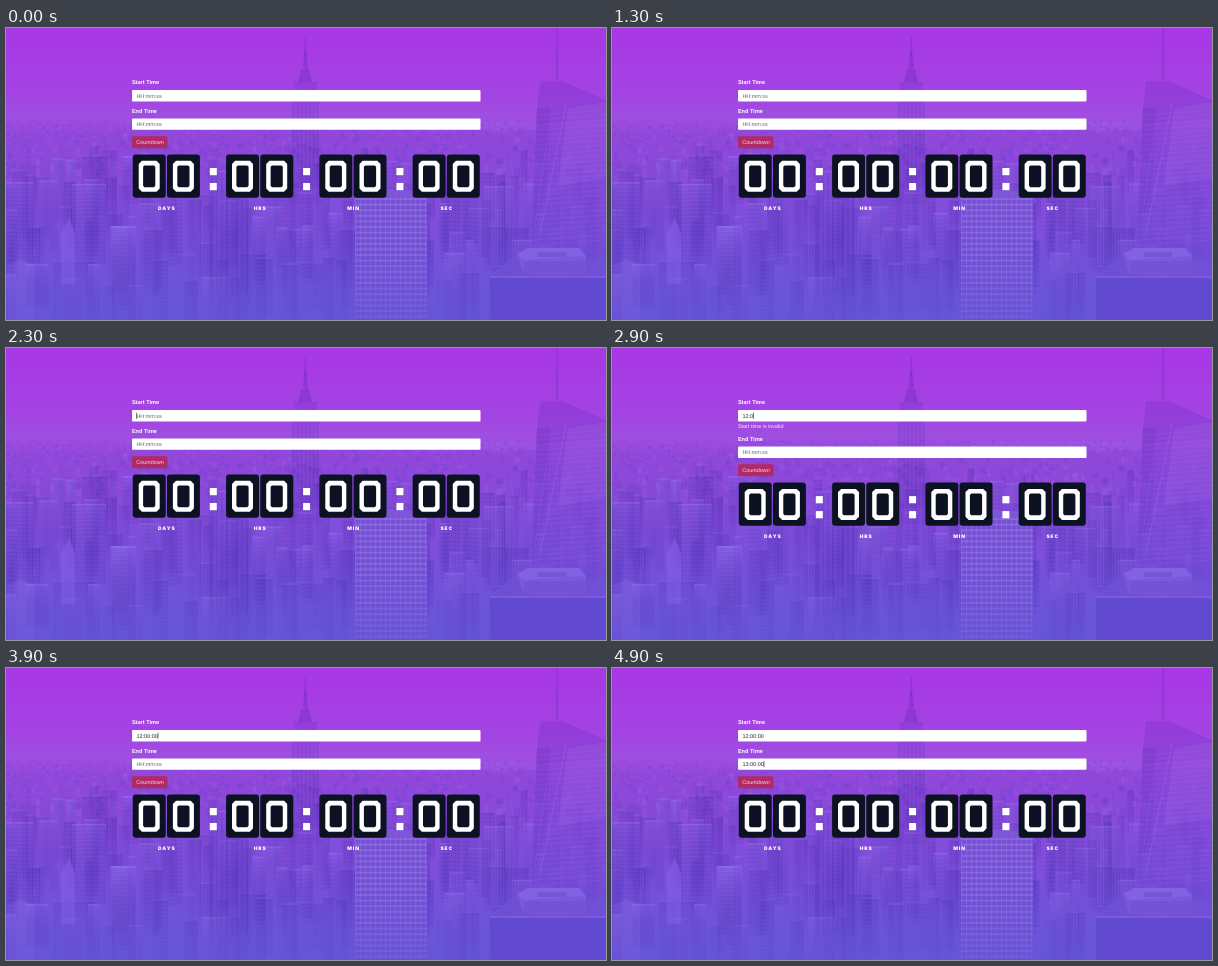
An HTML page with a canvas for the animation above (5 s loop, 600 by 292 pixels).

```html
<!DOCTYPE html>
<html lang="en">
<head>
<meta charset="utf-8">
<title>Countdown</title>
<style>
html, body { margin: 0; width: 100%; height: 100%; overflow: hidden; background: #8a45e0; }
canvas, svg { position: absolute; left: 0; top: 0; width: 600px; height: 292px; display: block; }
text { font: 5.5px "Liberation Sans", Arial, sans-serif; fill: #fff; text-rendering: geometricPrecision; white-space: pre; }
.label { font-weight: 700; font-size: 5.6px; }
.error { fill: #f6ecff; font-size: 5.45px; }
.value { fill: #22252c; }
.value.empty { fill: #5f656d; font-size: 5.45px; }
.button { fill: #f6d3e2; font-size: 5.45px; }
.unit { font: 900 4.9px Inter, "Open Sans", sans-serif; letter-spacing: .95px; text-anchor: middle; }
</style>
</head>
<body>
<canvas id="city" width="600" height="292"></canvas>
<svg viewBox="0 0 600 292">
  <g id="start">
    <text class="label" x="125.9" y="56.4">Start Time</text>
    <rect x="126" y="62" width="348.5" height="11.4" rx="1" fill="#fff"/>
    <text class="value" x="130.4" y="69.6"></text>
    <rect class="caret" y="64.6" width=".6" height="6.2" fill="#222"/>
    <text class="error" x="125.9" y="79.9">Start time is invalid</text>
  </g>
  <g id="end">
    <text class="label" x="125.9" y="84.9">End Time</text>
    <rect x="126" y="90.4" width="348.5" height="11.4" rx="1" fill="#fff"/>
    <text class="value" x="130.4" y="98.1"></text>
    <rect class="caret" y="93.1" width=".6" height="6.2" fill="#222"/>
    <text class="error" x="125.9" y="108.3">End time is invalid</text>
  </g>
  <g id="lower">
    <rect x="126" y="108.2" width="35.4" height="12" rx="1.3" fill="#b02b66"/>
    <text class="button" x="130.3" y="116">Countdown</text>
    <g id="clock"></g>
  </g>
</svg>
<script>
const LOOP = 5000, SHIFT = 8.1;
const $ = s => document.querySelector(s);

// ---------- skyline ----------
const ctx = $('#city').getContext('2d');
let seed = 29;
const rnd = (a = 0, b = 1) => {
  seed = (seed * 16807) % 2147483647;
  return a + (b - a) * seed / 2147483647;
};
const dark = a => `rgba(62,34,160,${a})`;
const lite = a => `rgba(190,160,255,${a})`;
function box(x, y, w, h, fill) {
  ctx.fillStyle = fill;
  ctx.fillRect(x, y, w, h);
}
function poly(fill, ...p) {
  ctx.fillStyle = fill;
  ctx.beginPath();
  for (let i = 0; i < p.length; i += 2) ctx.lineTo(p[i], p[i + 1]);
  ctx.fill();
}
function line(stroke, x0, y0, x1, y1) {
  ctx.strokeStyle = stroke;
  ctx.lineWidth = .9;
  ctx.beginPath();
  ctx.moveTo(x0, y0);
  ctx.lineTo(x1, y1);
  ctx.stroke();
}
function fade(y0, y1, ...stops) {
  const g = ctx.createLinearGradient(0, y0, 0, y1);
  stops.forEach(([at, c]) => g.addColorStop(at, c));
  return g;
}
function windows(x, y, w, h, dx, dy, fill) {
  for (let r = y + 2; r < y + h; r += dy)
    for (let c = x + 1.5; c < x + w - 1.5; c += dx) box(c, r, dx * .5, dy * .5, fill);
}
function ribs(x, y, w, h, step, fill) {
  for (let c = x + 1; c < x + w; c += step) box(c, y, step * .4, h, fill);
}
// a block with a flat roof, a shaded side and fading foot
function tower(x, y, w, h, tone, style) {
  box(x, y, w, h, fade(y, y + h, [0, tone], [1, dark(.02)]));
  box(x + w * .62, y, w * .38, h, dark(.06));
  box(x, y, w, 1.5, lite(.13));
  if (style < .5) windows(x, y, w, h, 3, 4, dark(.1));
  else if (style < .7) ribs(x, y, w, h, 3, lite(.06));
}

function paintCity() {
  box(0, 0, 600, 292, fade(0, 292,
    [0, '#a837e5'], [.2, '#a442e3'], [.33, '#9b4ae0'], [.5, '#8a4bdb'], [.75, '#7850da'], [1, '#6856d6']));
  box(0, 66, 600, 40, fade(66, 106, [0, lite(0)], [.5, lite(.06)], [1, lite(0)]));
  box(0, 90, 600, 60, fade(90, 150, [0, dark(0)], [.3, dark(.08)], [1, dark(.04)]));
  box(360, 93, 170, 9, lite(.06));

  // distant blocks
  for (let i = 0; i < 800; i++) {
    const y = 92 + 50 * rnd() ** 1.2, k = (y - 86) / 40;
    box(rnd(-4, 600), y, rnd(1.5, 3 + 4 * k), rnd(1, 2 + 6 * k), rnd() < .55 ? dark(.09) : lite(.07));
  }
  // mid and near blocks
  for (let row = 0; row < 5; row++) {
    const base = 116 + row * 27;
    for (let x = -8; x < 600;) {
      const w = rnd(7, 17 + row * 3), y = base + rnd(0, 36), h = rnd(45, 95);
      const tone = rnd() < .5 ? dark(rnd(.06, .18)) : `rgba(142,100,232,${rnd(.2, .5)})`;
      tower(x, y, w, h, tone, rnd());
      x += w + rnd(0, 16);
    }
  }

  // central spire
  box(298.7, 9, 1, 20, dark(.25));
  poly(dark(.26), 297, 40, 298.5, 22, 300, 22, 302, 40);
  poly(dark(.24), 292, 54, 295, 41, 303, 41, 306, 54);
  box(288, 54, 23, 14, dark(.18));
  box(286, 68, 27, 92, dark(.15));
  box(282, 116, 35, 60, dark(.08));
  ribs(288, 56, 24, 110, 4, lite(.07));

  // left and middle landmarks
  tower(76, 127, 26, 60, dark(.14), .3);
  tower(66, 156, 34, 80, 'rgba(142,100,232,.35)', .3);
  tower(106, 198, 24, 94, 'rgba(142,104,236,.6)', .3);
  tower(203, 143, 40, 149, 'rgba(128,80,222,.6)', .9);
  ribs(204, 145, 38, 120, 5, dark(.13));
  poly('rgba(136,96,232,.6)', 55, 206, 63, 190, 69, 206, 69, 256, 55, 256);
  tower(0, 154, 28, 80, 'rgba(136,92,228,.45)', .2);
  poly(lite(.1), 2, 238, 14, 230, 28, 238, 28, 292, 2, 292);
  tower(433, 135, 40, 80, dark(.1), .3);
  tower(478, 158, 30, 90, 'rgba(132,88,224,.4)', .6);

  // lattice block
  box(349, 163, 72, 129, fade(163, 292, [0, '#7850d4'], [1, '#6a50d2']));
  box(349, 163, 72, 6, lite(.08));
  for (let y = 170; y < 292; y += 5.6) box(349, y, 72, 2, lite(.24));
  for (let x = 349; x < 421; x += 5) box(x, 169, 1.1, 123, lite(.18));

  // glass tower on the right
  box(550.6, 0, 1, 54, dark(.3));
  for (let y = 26; y < 54; y += 4) box(549.6, y, 3, .8, dark(.2));
  poly(dark(.16), 531, 82, 534, 53, 556, 53, 600, 72, 600, 90, 531, 96);
  poly(fade(70, 230, [0, 'rgba(142,62,214,.65)'], [1, 'rgba(114,74,214,.6)']),
    531, 80, 558, 78, 600, 72, 600, 224, 524, 224);
  poly(lite(.1), 562, 80, 600, 74, 600, 150, 552, 158);
  poly(dark(.1), 531, 80, 546, 79, 540, 150, 526, 220);
  for (let y = 84; y < 216; y += 5) line(lite(.1), 531 - (y - 84) / 22, y + 3, 600, y - 2);
  line(lite(.2), 560, 76, 534, 206);
  line(lite(.14), 546, 79, 528, 206);

  // lower fade and roof at the right
  box(0, 215, 600, 77, fade(215, 292, [0, 'rgba(108,86,220,0)'], [1, 'rgba(100,84,216,.5)']));
  poly('rgba(112,80,216,.8)', 484, 246, 512, 226, 600, 232, 600, 292, 484, 292);
  poly('#7b58dc', 511, 226, 522, 220, 573, 220, 580, 228, 580, 247, 518, 247);
  poly(lite(.12), 511, 226, 522, 220, 573, 220, 580, 228, 518, 232);
  box(532, 224, 28, 5, dark(.18));
  box(518, 233, 62, 14, dark(.1));
  box(484, 248, 116, 2, lite(.14));
  box(484, 250, 116, 42, 'rgba(82,64,200,.4)');
}

// ---------- clock ----------
const zero = (x, y) => `<path fill="#fff" fill-rule="evenodd" transform="translate(${x} ${y})"
  d="M3.2 0H17.8L21 3.2V27.8L17.8 31H3.2L0 27.8V3.2ZM5.8 4.6L4.4 6V25L5.8 26.4H15.2L16.6 25V6L15.2 4.6Z"/>`;
const card = x => `<rect x="${x}" y="126.5" width="32.9" height="43.2" rx="3" fill="#0c1222"/>` +
  zero(x + 5.9, 132.8);
const dots = x => [140, 155].map(y =>
  `<rect x="${x}" y="${y}" width="7" height="7.2" fill="#fff"/>`).join('');

function buildClock() {
  $('#clock').innerHTML = ['DAYS', 'HRS', 'MIN', 'SEC'].map((name, i) => {
    const x = 126.8 + i * 93.3;
    return card(x) + card(x + 34.2) + (i < 3 ? dots(x + 77) : '') +
      `<text class="unit" x="${x + 34.1}" y="181.9">${name}</text>`;
  }).join('');
}

// ---------- form ----------
const fields = [
  { id: 'start', text: '12:00:00', focus: [2000, 4000],
    keys: [2500, 2700, 2800, 2900, 3000, 3050, 3100, 3700] },
  { id: 'end', text: '13:00:00', focus: [4000, 5000],
    keys: [4200, 4400, 4500, 4600, 4700, 4750, 4800, 4900] }
];
for (const f of fields) {
  f.value = $(`#${f.id} .value`);
  f.caret = $(`#${f.id} .caret`);
  f.error = $(`#${f.id} .error`);
}
const show = (el, on) => el.setAttribute('visibility', on ? 'visible' : 'hidden');
const move = (id, y) => $(id).setAttribute('transform', `translate(0 ${y})`);
const widthOf = s => [...s].reduce((w, c) => w + (c === ':' ? .278 : .556) * 5.5, 0);

function drawField(f, t) {
  const n = f.keys.filter(k => k <= t).length;
  const typed = f.text.slice(0, n);
  const [from, to] = f.focus;
  const since = t - (n ? f.keys[n - 1] : from);
  const bad = n > 0 && n < f.text.length;
  f.value.textContent = typed || 'HH:mm:ss';
  f.value.classList.toggle('empty', !n);
  f.caret.setAttribute('x', 130.3 + widthOf(typed));
  show(f.caret, t >= from && t < to && since % 1000 < 500);
  show(f.error, bad);
  return bad ? SHIFT : 0;
}

function frame() {
  const t = performance.now() % LOOP;
  const [a, b] = fields.map(f => drawField(f, t));
  move('#end', a);
  move('#lower', a + b);
  requestAnimationFrame(frame);
}

paintCity();
buildClock();
frame();
</script>
</body>
</html>
```
